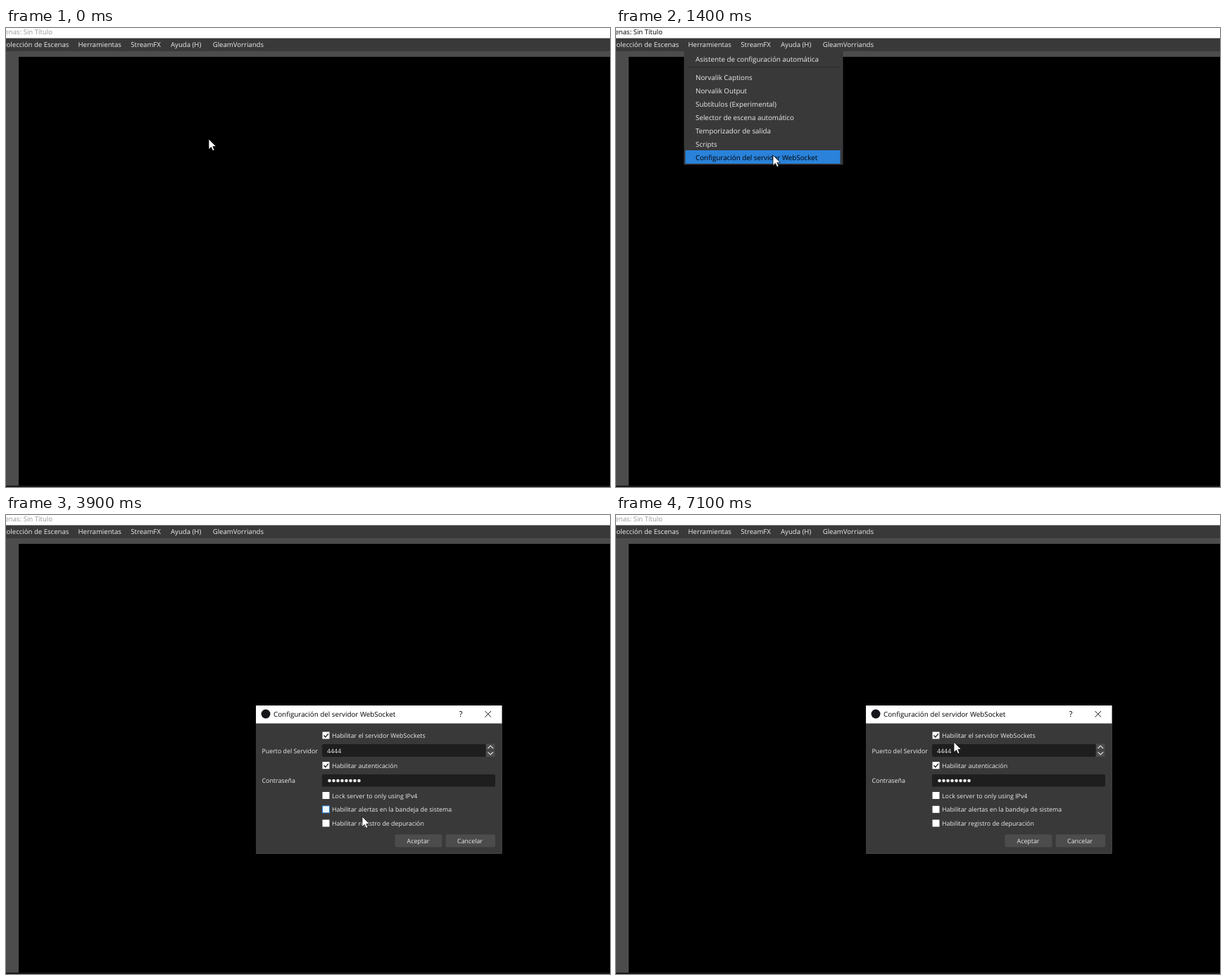
An HTML page that plays this animation: 858x653 px, repeating every 7200 ms.

```html
<!DOCTYPE html>
<html lang="es">
<head>
<meta charset="utf-8">
<title>Configuración del servidor WebSocket</title>
<style>
  html, body { margin: 0; width: 100%; height: 100%; overflow: hidden; background: #000; }
  svg { display: block; }
  text { font: 9.82px "Open Sans", "Noto Sans", sans-serif; fill: #ececec; text-rendering: geometricPrecision; }
  #bar text { font-size: 9.6px; }
  #form text { font-size: 8.85px; }
  .end { text-anchor: end; }
  .mid { text-anchor: middle; }
  .line { fill: none; stroke: #ddd; stroke-width: 1.2; }
</style>
</head>
<body>
<svg width="858" height="653" viewBox="0 0 858 653">
  <rect width="858" height="653" fill="#000"/>
  <path d="M0 33H858V41H18V651H0Z" fill="#4c4c4c"/>
  <rect y="651" width="858" height="2" fill="#181818"/>
  <rect y="14" width="858" height="19" fill="#3a393a"/>
  <rect width="858" height="14.5" fill="#fff"/>
  <g id="bar">
    <text id="title" class="end" x="66" y="8.8">Colección de Escenas: Sin Título</text>
    <text class="end" x="89.3" y="27">Colección de Escenas</text>
    <text x="102.5" y="27">Herramientas</text>
    <text x="177.3" y="27">StreamFX</text>
    <text x="234" y="27">Ayuda (H)</text>
    <text x="293.7" y="27">GleamVorriands</text>
  </g>

  <g id="menu">
    <rect x="96.5" y="33" width="226" height="161.5" fill="#3a393a"/>
    <path d="M101 55.5H317" stroke="#282828"/>
    <rect id="highlight" x="98.5" width="220" height="19" fill="#2a82da"/>
  </g>

  <g id="dialog">
    <rect x="355" y="271" width="349.5" height="211" fill="#3a393a"/>
    <path d="M355 481.5H704V296" fill="none" stroke="#4a4a4a"/>
    <rect x="355" y="271" width="349.5" height="25.5" fill="#fff"/>
    <circle cx="369" cy="283" r="6.5" fill="#15151a"/>
    <text x="380" y="287" style="fill:#000">Configuración del servidor WebSocket</text>
    <text class="mid" x="646" y="287" style="fill:#000;font-size:11px">?</text>
    <path d="M680.5 279L689 287.5M689 279L680.5 287.5" stroke="#111"/>
    <g id="form">
      <text x="363.5" y="338.5">Puerto del Servidor</text>
      <text x="363.5" y="381">Contraseña</text>
      <rect x="449" y="326" width="232.5" height="18" rx="2" fill="#1f1e1f"/>
      <text x="456" y="338.5">4444</text>
      <path d="M682 325.5H694.5V334.3H682ZM682 335.2H694.5V344H682Z" fill="#4c4c4c"/>
      <path class="line" d="M684.5 332L688.2 328.3L692 332M684.5 337.3L688.2 341L692 337.3"/>
      <rect x="449" y="369" width="246" height="17.5" rx="2" fill="#1f1e1f"/>
      <g id="selection">
        <rect x="456" y="371.5" width="49" height="12.5" fill="#2a82da"/>
        <path d="M505.2 371.5V384" stroke="#fff"/>
      </g>
      <g id="dots"></g>
      <rect x="552.5" y="454.5" width="67" height="18" rx="2" fill="#4c4c4c"/>
      <rect x="624.5" y="454.5" width="70.5" height="18" rx="2" fill="#4c4c4c"/>
      <text class="mid" x="585.5" y="467">Aceptar</text>
      <text class="mid" x="659" y="467">Cancelar</text>
    </g>
  </g>

  <path id="cursor" d="M0 0V14.6L3.4 11.4L5.7 16.6L8 15.6L5.8 10.5H10.4Z" fill="#fff" stroke="#000" stroke-width=".7"/>
</svg>
<script>
const LOOP = 7200, STEP = 100;
const $ = id => document.getElementById(id);

function add(parent, tag, attrs, text = "") {
  const el = document.createElementNS("http://www.w3.org/2000/svg", tag);
  for (const key in attrs) el.setAttribute(key, attrs[key]);
  el.textContent = text;
  return parent.appendChild(el);
}

const items = [
  "Asistente de configuración automática", "Norvalik Captions", "Norvalik Output",
  "Subtítulos (Experimental)", "Selector de escena automático",
  "Temporizador de salida", "Scripts", "Configuración del servidor WebSocket"
].map((label, i) => {
  const y = i ? 52.1 + 18.85 * i : 44.5;
  return { y, el: add($("menu"), "text", { x: 113, y: y + 3.5 }, label) };
});

const boxes = [
  [313.5, "Habilitar el servidor WebSockets", true],
  [356.2, "Habilitar autenticación", true],
  [399, "Lock server to only using IPv4"],
  [418.8, "Habilitar alertas en la bandeja de sistema"],
  [438.5, "Habilitar registro de depuración"]
].map(([y, label, checked]) => {
  add($("form"), "text", { x: 463, y: y + 3.6 }, label);
  const box = add($("form"), "rect", { x: 449.5, y: y - 5, width: 10, height: 10, fill: "#fff" });
  if (checked)
    add($("form"), "path", { d: `M451.5 ${y}l2.3 2.6 4-5`, fill: "none", stroke: "#111", "stroke-width": 1.3 });
  return box;
});

for (let i = 0; i < 8; i++) add($("dots"), "circle", { cx: 459.5 + 6 * i, cy: 378, r: 2.3 });

// Cursor tip: time, x, y
const path = [
  [0, 288, 158], [200, 280, 140], [500, 150, 30], [600, 136, 22], [700, 140, 25],
  [800, 157, 44], [1100, 190, 120], [1400, 223, 181], [1500, 225, 182],
  [1600, 290, 212], [1800, 522, 313], [2500, 492, 374], [3200, 500, 412],
  [3900, 506, 429], [4500, 502, 470], [5000, 500, 450], [5500, 499, 431],
  [5800, 498, 403], [7100, 480, 323]
];

function cursorAt(t) {
  const i = Math.max(1, path.findIndex(p => p[0] >= t));
  const [t0, x0, y0] = path[i - 1], [t1, x1, y1] = path[i];
  const k = (t - t0) / (t1 - t0);
  return [x0 + (x1 - x0) * k, y0 + (y1 - y0) * k];
}

// Checkbox hover: index, start, end
const hovers = [[0, 1900, 2100], [1, 2200, 2500], [2, 2900, 3300], [3, 3400, 4000], [4, 4000, 4400], [4, 5000, 5700]];
const show = (el, on) => el.style.display = on ? "" : "none";

function draw(t) {
  const [x, y] = cursorAt(t);
  $("cursor").setAttribute("transform", `translate(${x} ${y})`);
  $("title").style.fill = t >= 600 && t < 1600 ? "#000" : "#999";

  show($("menu"), t >= 700 && t < 1600);
  $("menu").style.opacity = t < 800 ? 0.5 : 1;
  const active = t >= 900 && items.find(item => Math.abs(item.y - y) < 9.5);
  show($("highlight"), active);
  if (active) $("highlight").setAttribute("y", Math.round(active.y - 10));
  for (const item of items) item.el.style.fill = item === active ? "#000" : "";

  show($("dialog"), t >= 1600);
  const selected = t < 2500;
  show($("selection"), selected);
  $("dots").setAttribute("fill", selected ? "#000" : "#e8e8e8");
  boxes.forEach((box, i) => {
    const hovered = hovers.some(([n, from, to]) => n === i && t >= from && t < to);
    box.setAttribute("stroke", hovered ? "#2a82da" : "none");
    box.setAttribute("fill", hovered ? "#eef6ff" : "#fff");
  });
}

function tick() {
  draw(Math.floor(performance.now() % LOOP / STEP) * STEP);
  requestAnimationFrame(tick);
}
tick();
</script>
</body>
</html>
```
